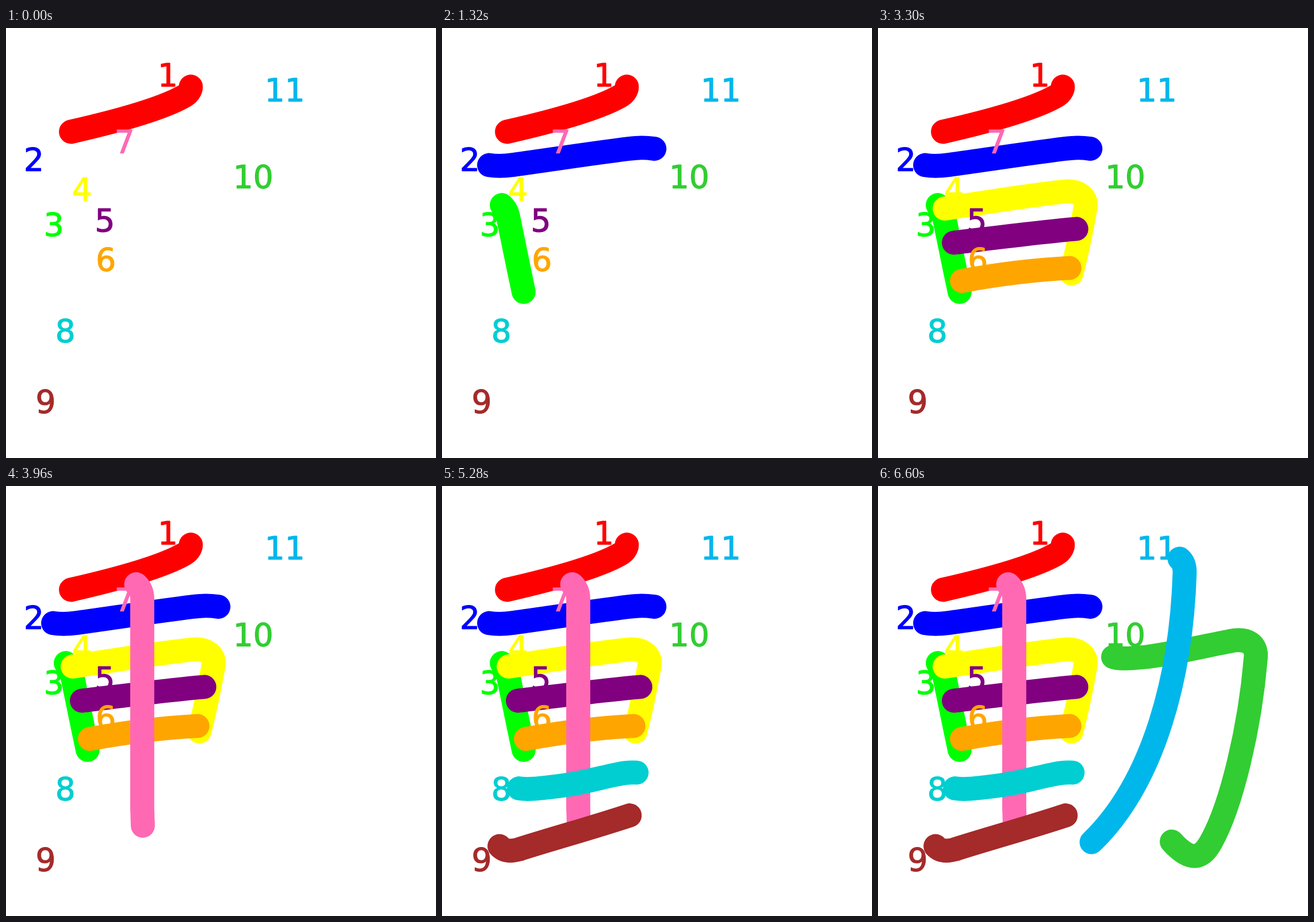
Write an HTML page with a canvas that moves like this. It is 748 px wide and 748 px high and loops after 7260 ms.

```html
<!DOCTYPE html>
<html lang="en">
<head>
<meta charset="utf-8">
<title>Stroke order</title>
<style>
  html, body { margin: 0; width: 100%; height: 100%; overflow: hidden; background: #fff; }
  canvas { display: block; width: 748px; height: 748px; }
</style>
</head>
<body>
<canvas id="stage" width="748" height="748"></canvas>
<script>
const SIZE = 748;
const STEP = 660;
const BRUSH = 41.8;
const LABEL = 55;
const ctx = document.getElementById('stage').getContext('2d');

// colour, label x, label baseline, path
const strokes = [
  ['#ff0000', 264, 100.5, 'M321.5 102C321.5 108 317 115 309 119C270 141 190 163 113 180.5'],
  ['#0000ff', 31, 248, 'M82 238.5C94 240.5 110 240 124 238C190 229 260 218 325 210C342 208 352 207.5 369.5 210'],
  ['#00ff00', 65.7, 361, 'M104 308C109 313 113 319 114.5 326C120 353 132 412 142 459'],
  ['#ffff00', 114.7, 299.5, 'M116 314C185 304 260 291 325 284.5C347 282.5 364 293 361 312C355 345 347 387 336.5 427'],
  ['#800080', 154.5, 354, 'M132 373.5C195 366 290 354 345 349.5'],
  ['#ffa500', 156.3, 422, 'M146 440C200 430 265 421 333 417.5'],
  ['#ff69b4', 188.7, 217, 'M226.5 171C233 177 237 185 237 196L237 560L238 591'],
  ['#00ced1', 85.8, 546, 'M134 526C146 528 155 527 163 526.5C230 520 250 514 293 504C312 500 322 497.5 338.5 498.5'],
  ['#a52a2a', 51.4, 669, 'M100 626.5C108 635 118 636.5 134 632C190 614 260 595 326.5 573'],
  ['#32cd32', 395, 278, 'M409 297.5C420 302 450 299 470 297C515 291 570 278 612 270C642 263.5 660 275 657 300C647 420 615 555 580 618C563 650 543 654 511 618.5'],
  ['#00b7eb', 450, 127, 'M524.5 126.5C531 132 533.5 140 533.5 150C528 330 480 515 371.5 619.5']
].map(([color, x, y, d]) => ({ color, x, y, path: new Path2D(d) }));

function draw(count) {
  ctx.fillStyle = '#fff';
  ctx.fillRect(0, 0, SIZE, SIZE);
  ctx.lineCap = ctx.lineJoin = 'round';
  ctx.lineWidth = BRUSH;
  for (const s of strokes.slice(0, count)) {
    ctx.strokeStyle = s.color;
    ctx.stroke(s.path);
  }
  // a thin outline thickens the numerals
  ctx.font = `${LABEL}px "DejaVu Sans", Verdana, sans-serif`;
  ctx.lineWidth = 1.2;
  strokes.forEach((s, i) => {
    ctx.fillStyle = ctx.strokeStyle = s.color;
    ctx.fillText(i + 1, s.x, s.y);
    ctx.strokeText(i + 1, s.x, s.y);
  });
}

const start = performance.now();

function tick() {
  const t = Math.max(0, performance.now() - start);
  draw(Math.floor(t / STEP) % strokes.length + 1);
  requestAnimationFrame(tick);
}
tick();
</script>
</body>
</html>
```
